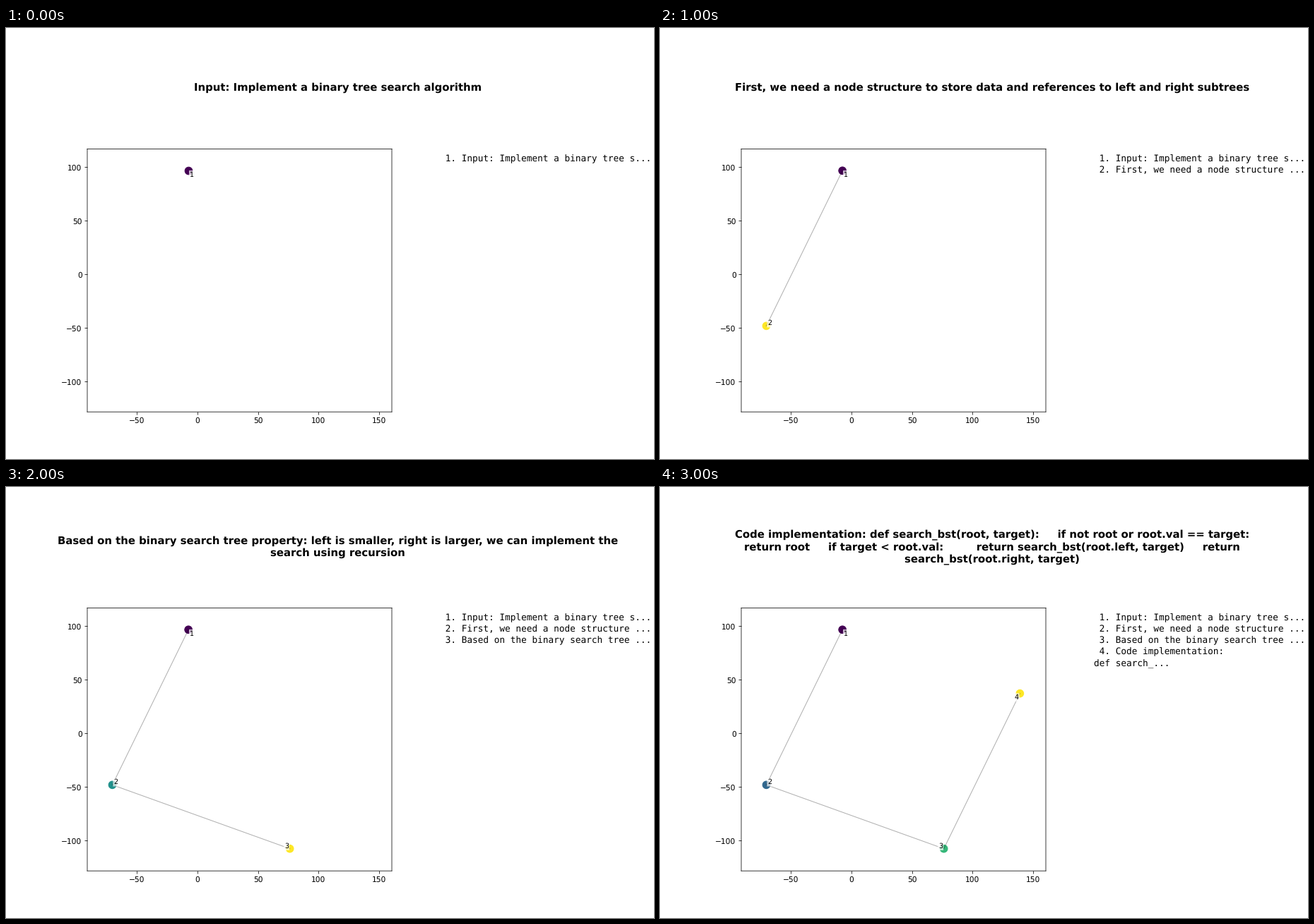
Write a matplotlib script that moves like this. It is 917 by 611 pixels and loops after 4000 ms.

```python
import matplotlib.pyplot as plt
import numpy as np
from matplotlib.animation import FuncAnimation

WIDTH, HEIGHT, DPI = 917, 611, 76.4
LEFT, RIGHT, TOP, BOTTOM = 115.0, 546.0, 171.4, 544.2
SUMMARY_LENGTH = 32

# Thin lines and glyphs stay unsnapped, for soft sub-pixel edges.
plt.rcParams.update({
    "font.family": "DejaVu Sans",
    "text.hinting": "none",
    "path.snap": False,
    "axes.linewidth": 0.72,
    "xtick.major.width": 0.72,
    "ytick.major.width": 0.72,
})

# Each step: headline broken into lines, and the text its list entry is cut from.
STEPS = [
    ("Input: Implement a binary tree search algorithm",) * 2,
    ("First, we need a node structure to store data and references "
     "to left and right subtrees",) * 2,
    ("Based on the binary search tree property: left is smaller, "
     "right is larger, we can implement the\nsearch using recursion",) * 2,
    ("Code implementation: def search_bst(root, target):     "
     "if not root or root.val == target:\n"
     "return root     if target < root.val:         "
     "return search_bst(root.left, target)     return\n"
     "search_bst(root.right, target)",
     "Code implementation:\ndef search_bst(root, target):"),
]
POINTS = np.array([(-7.4, 96.7), (-70.2, -48.1), (76.3, -107.6), (139.1, 37.2)])


def make_label(number, point):
    """Number beside a node, shifted towards the middle of the plot."""
    dx = 4.9 if point[0] < 30 else -4.6
    dy = -8.3 if point[1] > 0 else 1.0
    return ax.annotate(
        str(number), point, xytext=(dx * 72 / DPI, dy * 72 / DPI),
        textcoords="offset points", ha="center", va="baseline", fontsize=9,
        bbox=dict(facecolor="white", edgecolor="none", alpha=0.7, pad=1))


fig = plt.figure(figsize=((WIDTH + 0.001) / DPI, (HEIGHT + 0.001) / DPI),
                 dpi=DPI, facecolor="white")
ax = fig.add_axes([LEFT / WIDTH, 1 - BOTTOM / HEIGHT,
                   (RIGHT - LEFT) / WIDTH, (BOTTOM - TOP) / HEIGHT])
ax.set_xlim(-90.9, 160.5)
ax.set_ylim(-128.3, 117.0)

nodes = ax.scatter([], [], s=100, c=[], cmap="viridis")
path, = ax.plot([], [], "k-", lw=1, alpha=0.3)
labels = [make_label(i, p) for i, p in enumerate(POINTS, 1)]

title = fig.text(0.5122, 1 - 85.1 / HEIGHT, "", fontsize=14, linespacing=1.25,
                 fontweight="bold", ha="center", va="center")
history = fig.text(0.6698, 1 - 179.3 / HEIGHT, "", fontsize=12, linespacing=1.345,
                   family="DejaVu Sans Mono", ha="left", va="top")


def update(frame):
    count = frame + 1
    nodes.set_offsets(POINTS[:count])
    nodes.set_array(np.arange(count, dtype=float))
    nodes.set_clim(0, max(frame, 1))
    path.set_data(*POINTS[:count].T)
    for i, label in enumerate(labels):
        label.set_visible(i < count)
    title.set_text(STEPS[frame][0])
    history.set_text("\n".join(
        f" {i}. {text[:SUMMARY_LENGTH]}..."
        for i, (_, text) in enumerate(STEPS[:count], 1)))
    return nodes, path, title, history, *labels


animation = FuncAnimation(fig, update, frames=len(STEPS), interval=1000,
                          repeat=True, repeat_delay=0, blit=False)
plt.show()
```
